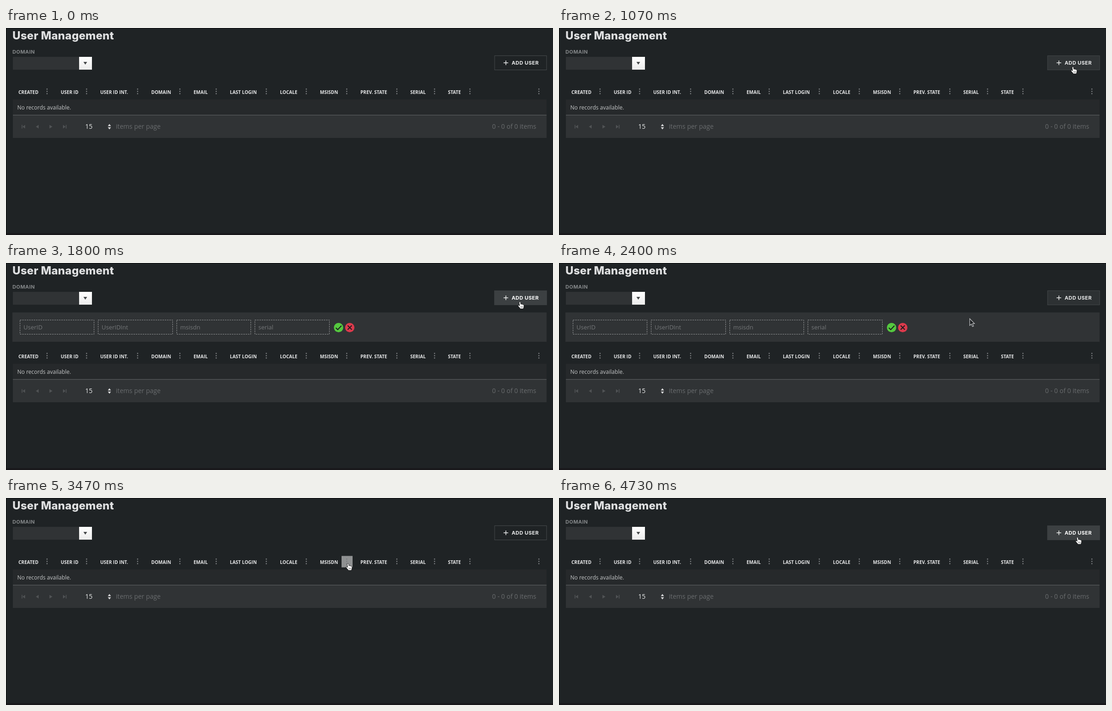
An HTML page for the animation above (5870 ms loop, 1190x452 px).

```html
<!DOCTYPE html>
<html lang="en">
<head>
<meta charset="utf-8">
<title>User Management</title>
<style>
html, body { margin: 0; width: 100%; height: 100%; overflow: hidden; background: #1f2325; }
svg { display: block; width: 1190px; height: 452px; }
text { font-family: "Open Sans", "Noto Sans", sans-serif; white-space: pre; }
.title, .label, .add { font-family: Inter, "Open Sans", sans-serif; font-weight: 700; }
.title { font-size: 24px; font-weight: 800; letter-spacing: .2px; fill: #dfe0e1; }
.label { font-size: 11px; letter-spacing: .4px; fill: #85888a; }
.add { font-size: 11px; letter-spacing: .4px; fill: #e9eaeb; }
.head { font-size: 10px; font-weight: 700; fill: #e6e7e8; }
.row { font-size: 12px; fill: #c6c8c9; }
.pager { font-size: 14px; fill: #696c6e; }
.hint { font-size: 13px; fill: #75787a; }
.dots { fill: none; stroke: #7b7e80; stroke-width: 2.6; stroke-linecap: round; stroke-dasharray: 0 5; }
.field { fill: none; stroke: #9b9d9e; stroke-dasharray: 3 2; }

/* Every animation shares the loop; values hold until the next keyframe. */
.grid, .panel, .cell, .glow, .add, .cursor, .arrow, .hand {
  animation: 5.87s step-end infinite;
}
.grid { animation-name: shift; }
.panel { animation-name: panel; }
.last { animation-name: last; }
.msisdn { animation-name: msisdn; }
.glow { animation-name: glow; }
.add { animation-name: dim; }
.cursor { animation-name: move; }
.arrow { animation-name: arrow; }
.hand { animation-name: hand; }

@keyframes shift {
  0%, 59.063% { transform: none; }
  27.206% { transform: translateY(64px); }
}
@keyframes panel {
  0%, 59.063% { opacity: 0; }
  27.206% { opacity: 1; }
}
@keyframes last {
  0%, 12.385% { opacity: 0; }
  8.978% { opacity: 1; }
}
@keyframes msisdn {
  0% { opacity: 0; fill: #8f9192; }
  59.063% { opacity: 1; fill: #8f9192; }
  60.085% { opacity: 1; fill: #303436; }
  64.685% { opacity: 0; fill: #303436; }
}
@keyframes glow {
  0% { opacity: 0; }
  13.578% { opacity: 0; animation-timing-function: steps(7); }
  21.584% { opacity: 1; }
  24.991% { opacity: .7; }
  26.014% { opacity: .36; }
  27.206% { opacity: .45; animation-timing-function: steps(3); }
  30.613% { opacity: 1; }
  37.428% { opacity: 1; animation-timing-function: steps(6); }
  44.242% { opacity: 0; }
  73.714% { opacity: 0; animation-timing-function: steps(6); }
  80.528%, 100% { opacity: 1; }
}
@keyframes dim {
  0% { fill: #e9eaeb; }
  21.584% { fill: #fff; }
  24.991% { fill: #b8babb; }
  26.014% { fill: #858889; }
  27.206% { fill: #a0a2a3; animation-timing-function: steps(3); }
  30.613% { fill: #fff; }
  40.835% { fill: #e9eaeb; }
  77.121%, 100% { fill: #fff; }
}
@keyframes move {
  0% { transform: translate(1184px, 179px); }
  7.956% { transform: translate(1177px, 163px); }
  8.978% { transform: translate(1169px, 144px); }
  10.17% { transform: translate(1161px, 126px); }
  11.363% { transform: translate(1153px, 111px); }
  12.385% { transform: translate(1142px, 100px); }
  13.578% { transform: translate(1130px, 91px); }
  14.77% { transform: translate(1121px, 87px); }
  15.792% { transform: translate(1118px, 85px); }
  36.235% { transform: translate(1112px, 86px); }
  37.428% { transform: translate(1083px, 90px); }
  38.62% { transform: translate(1030px, 99px); }
  39.642% { transform: translate(962px, 110px); }
  40.835% { transform: translate(893px, 121px); }
  42.027% { transform: translate(832px, 130px); }
  43.049% { transform: translate(789px, 136px); }
  44.242% { transform: translate(762px, 138px); }
  45.434% { transform: translate(745px, 140px); }
  46.457% { transform: translate(743px, 142px); }
  47.649% { transform: translate(743px, 143px); }
  51.056% { transform: translate(744px, 142px); }
  52.249% { transform: translate(744px, 143px); }
  63.492% { transform: translate(751px, 142px); }
  64.685% { transform: translate(776px, 138px); }
  65.877% { transform: translate(828px, 131px); }
  66.899% { transform: translate(898px, 121px); }
  68.092% { transform: translate(973px, 111px); }
  69.284% { transform: translate(1040px, 103px); }
  70.307% { transform: translate(1091px, 97px); }
  71.499% { transform: translate(1123px, 93px); }
  72.692% { transform: translate(1137px, 90px); }
  73.714% { transform: translate(1136px, 89px); }
  74.906% { transform: translate(1132px, 87px); }
  76.099%, 100% { transform: translate(1128px, 86px); }
}
@keyframes arrow {
  0%, 14.77%, 45.434%, 73.714%, 100% { opacity: 0; }
  6.763%, 38.62%, 64.685% { opacity: 1; }
}
@keyframes hand {
  0%, 38.62%, 64.685% { opacity: 0; }
  14.77%, 45.434%, 73.714%, 100% { opacity: 1; }
}
</style>
</head>
<body>
<svg viewBox="0 0 1190 452">
  <defs>
    <linearGradient id="knob" x2="0" y2="1">
      <stop stop-color="#fff"/><stop offset="1" stop-color="#ebebeb"/>
    </linearGradient>
  </defs>
  <rect width="1190" height="452" fill="#1f2325"/>
  <rect y="448" width="1190" height="4" fill="#19181b"/>
  <path d="M0 .5H1190M.5 0V452" stroke="#08090a"/>

  <text class="title" x="14" y="25">User Management</text>
  <text class="label" x="14" y="56">DOMAIN</text>
  <rect x="15" y="63" width="144" height="28" fill="#303335"/>
  <rect x="159" y="63" width="28" height="28" fill="url(#knob)"/>
  <path d="M168.5 74h8l-4 6z" fill="#444749"/>

  <rect x="1063" y="60.5" width="113" height="31" fill="none" stroke="#464a4c"/>
  <rect class="glow" x="1062.5" y="60" width="114" height="32" fill="#3c4042"/>
  <path d="M1082.5 76h10M1087.5 71v10" stroke="#f2f3f3" stroke-width="1.4"/>
  <text class="add" x="1100" y="80">ADD USER</text>

  <g class="panel">
    <rect x="14" y="108" width="1162" height="64" fill="#303335"/>
    <rect class="field" x="30.5" y="124.5" width="161" height="31"/>
    <rect class="field" x="200.5" y="124.5" width="162" height="31"/>
    <rect class="field" x="371.5" y="124.5" width="161" height="31"/>
    <rect class="field" x="541.5" y="124.5" width="162" height="31"/>
    <text class="hint" y="145"><tspan x="38">UserID</tspan><tspan x="208">UserIDInt</tspan><tspan x="379">msisdn</tspan><tspan x="549">serial</tspan></text>
    <circle cx="723.5" cy="141" r="10.2" fill="#55c83f"/>
    <circle cx="747.8" cy="141" r="10.2" fill="#dc3a4c"/>
    <path d="M717.5 141.5l4.2 4 8-8.5M743.3 136.5l9 9m0-9l-9 9" fill="none" stroke="#191c1e" stroke-width="2"/>
  </g>

  <g class="grid">
    <rect class="cell last" x="1147" y="126" width="24" height="25" fill="#303436"/>
    <rect class="cell msisdn" x="730" y="126.5" width="24" height="25"/>
    <text class="head" y="144"><tspan x="27">CREATED</tspan><tspan x="119">USER ID</tspan><tspan x="205">USER ID INT.</tspan><tspan x="316">DOMAIN</tspan><tspan x="408">EMAIL</tspan><tspan x="487">LAST LOGIN</tspan><tspan x="596">LOCALE</tspan><tspan x="683">MSISDN</tspan><tspan x="771">PREV. STATE</tspan><tspan x="879.5">SERIAL</tspan><tspan x="961.5">STATE</tspan></text>
    <path class="dots" d="M89.3 133.4v10.1M175.3 133.4v10.1M286.3 133.4v10.1M378.3 133.4v10.1M457.3 133.4v10.1M566.3 133.4v10.1M653.3 133.4v10.1M741.3 133.4v10.1M850.3 133.4v10.1M932.3 133.4v10.1M1009.3 133.4v10.1M1159.3 133.4v10.1"/>
    <rect x="15" y="156" width="1161" height="34" fill="#26292b"/>
    <rect x="15" y="190" width="1161" height="50" fill="#303335"/>
    <path d="M15 190.2H1176" stroke="#66696a"/>
    <text class="row" x="24.5" y="178">No records available.</text>
    <g fill="#505355">
      <path d="M34 211.5h1.6v8H34zM41.5 211.5v8l-5.5-4z"/>
      <path d="M71 211.5v8l-6-4z"/>
      <path d="M94.5 211.5v8l6.5-4z"/>
      <path d="M124 211.5v8l5.5-4zM130 211.5h1.6v8H130z"/>
    </g>
    <path d="M221.5 214.3h7l-3.5-4.8zM221.5 216.8h7l-3.5 4.8z" fill="#d9dadb"/>
    <text class="pager" y="220"><tspan x="172.3" fill="#eceded">15</tspan><tspan x="239">items per page</tspan><tspan x="1057.5">0 - 0 of 0 items</tspan></text>
  </g>

  <g class="cursor">
    <path class="arrow" d="M.5 .5V15.5L4 12.3L6.4 17.8L8.9 16.8L6.5 11.4H11Z" fill="#1c1f21" stroke="#c2c4c6" stroke-width="1.2"/>
    <g class="hand">
      <path d="M-1.7 1.3C-1.7-.6 1.3-.6 1.5 1.2L2 5.2C2.6 4.2 4.4 4.4 4.6 5.5C5.3 4.7 6.7 5 6.9 6.2C7.7 5.7 8.8 6.1 8.8 7.3V10.2C8.8 12 7.6 13 7.6 15H.6C.3 12.8-3 10.8-4 8.6C-4.3 7-2.5 6.5-.6 8.5Z" fill="#fff" stroke="#0c0d0e" stroke-width=".9" stroke-linejoin="round"/>
      <path d="M2 9.5v3M4 9.5v3M6 9.5v3" stroke="#222" stroke-width=".7"/>
    </g>
  </g>
</svg>
</body>
</html>
```
